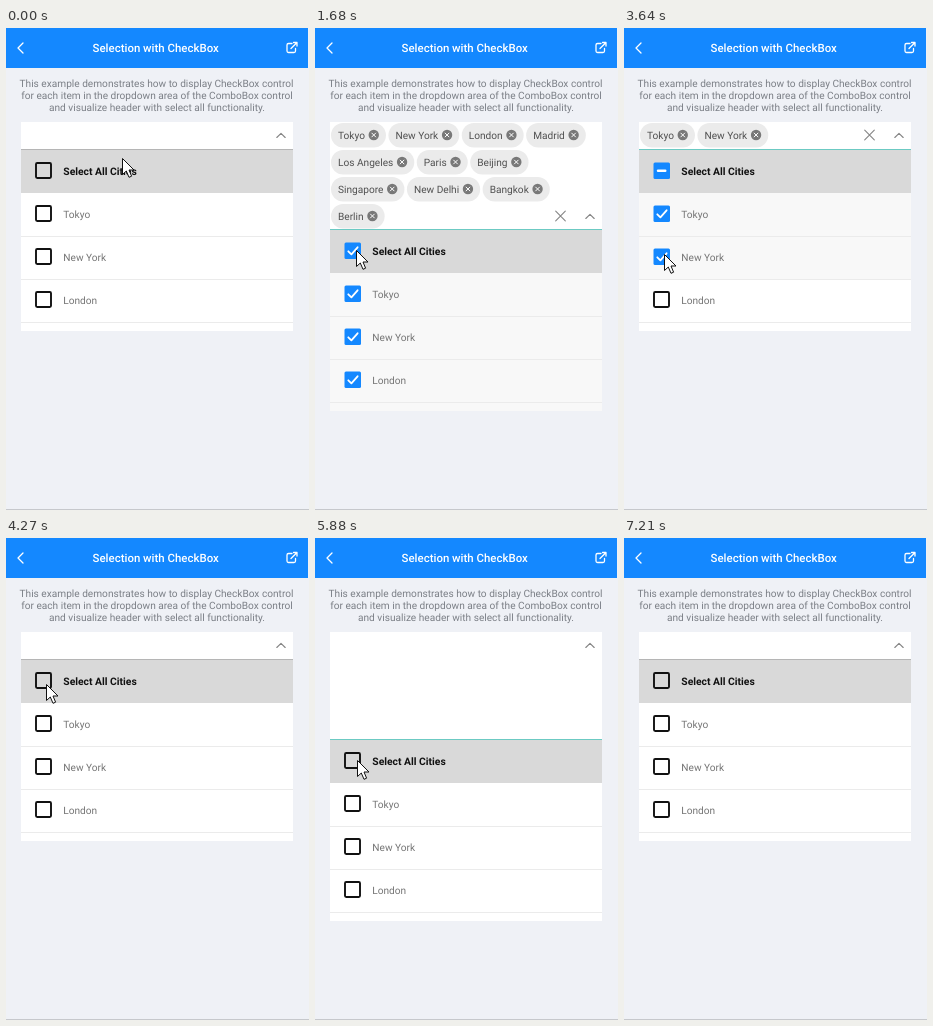
Animation, 303 px wide and 482 px high, one loop 8 s. Source, as an HTML page:

```html
<!DOCTYPE html>
<html lang="en">
<head>
<meta charset="utf-8">
<title>Selection with CheckBox</title>
<style>
html, body { margin: 0; height: 100%; overflow: hidden; background: #eff1f6; }
svg { display: block; width: 303px; height: 482px; font: 10.15px Roboto, sans-serif; text-rendering: geometricPrecision; }
.line { fill: none; stroke-linecap: round; stroke-linejoin: round; }
</style>
</head>
<body>
<svg viewBox="0 0 303 482">
  <rect width="302" height="40" fill="#1488ff"/>
  <rect y="481" width="303" height="1" fill="#c6c8cc"/>
  <text x="149.7" y="24" text-anchor="middle" font-size="11.45" font-weight="500" fill="#fff">Selection with CheckBox</text>
  <g class="line" stroke="#fff" stroke-width="1.3">
    <path d="M17 15L12 20L17 25"/>
    <path d="M286 15.500H282.500Q281 15.500 281 17V23Q281 24.500 282.500 24.500H288Q289.500 24.500 289.500 23V20.500M285 20.500L291 14.500M287.500 14.500H291V18"/>
  </g>
  <g text-anchor="middle" fill="#7b7f86">
    <text x="150.5" y="58.5">This example demonstrates how to display CheckBox control</text>
    <text x="151" y="70.5">for each item in the dropdown area of the ComboBox control</text>
    <text x="151" y="82.5">and visualize header with select all functionality.</text>
  </g>
  <g id="combo"></g>
  <path id="cursor" d="M0.500 0.500V16.500L4.300 13L7 19.300L9.600 18.200L7 12H12Z" fill="#fff" stroke="#111"/>
</svg>
<script>
const LOOP = 8000, STEP = 70;
const combo = document.getElementById('combo');
const cursor = document.getElementById('cursor');
const cities = ['Tokyo', 'New York', 'London', 'Madrid', 'Los Angeles', 'Paris',
  'Beijing', 'Singapore', 'New Delhi', 'Bangkok', 'Berlin'];
const ALL = cities.length;

// click time, cities selected afterwards
const clicks = [[0, 0], [770, ALL], [1960, 0], [2730, 1], [3360, 2], [4130, 0], [4900, ALL], [5880, 0]];

// pointer moves: arrival time, duration, x, y
const moves = [
  [560, 560, 37, 146], [1400, 210, 46, 246], [1680, 140, 41, 222],
  [2380, 280, 39, 195], [3080, 280, 40, 226], [3920, 280, 40, 146],
  [5600, 420, 42, 222], [6930, 840, 176, 225], [7210, 280, 240, 490]
];

const pen = document.createElement('canvas').getContext('2d');
pen.font = '10.15px Roboto, sans-serif';

const rect = (x, y, w, h, fill, more = '') =>
  `<rect x="${x}" y="${y}" width="${w}" height="${h}" fill="${fill}" ${more}/>`;
const line = (d, stroke, width) =>
  `<path class="line" d="${d}" stroke="${stroke}" stroke-width="${width}"/>`;
const text = (x, y, fill, label, more = '') =>
  `<text x="${x}" y="${y}" fill="${fill}" ${more}>${label}</text>`;
const cross = (x, y, r, stroke, width) =>
  line(`M${x - r} ${y - r}l${2 * r} ${2 * r}m0 ${-2 * r}l${-2 * r} ${2 * r}`, stroke, width);

// mark: 0 empty, 1 partial, 2 checked
function checkBox(top, mark) {
  if (!mark) return rect(30, top + 13, 15, 15, 'none', 'rx="1.2" stroke="#111" stroke-width="1.9"');
  const y = top + 20.8;
  const d = mark == 1 ? `M34 ${y}H41.300` : `M33.300 ${y + .5}L36.400 ${y + 3.600}L42.600 ${y - 3.500}`;
  return rect(29.5, top + 12.5, 16.5, 16.5, '#1488ff', 'rx="1.5"') + line(d, '#fff', mark == 1 ? 2.4 : 1.8);
}

function chips(count) {
  let out = '', x = 16, y = 107;
  for (const city of cities.slice(0, count)) {
    const width = pen.measureText(city).width + 28;
    if (x + width > 284) { x = 16; y += 27; }
    const close = x + width - 12.2;
    out += rect(x, y - 12, width, 24.5, '#ebebeb', 'rx="12.2"')
      + text(x + 7, y + 3.6, '#505050', city)
      + `<circle cx="${close}" cy="${y}" r="5.2" fill="#787878"/>`
      + cross(close, y, 1.9, '#fff', 1);
    x += width + 2.5;
  }
  return out;
}

function draw(count, chipCount, tall) {
  const top = tall ? 202 : 122;
  const iconY = tall && chipCount ? 188 : 107;
  const label = (y, fill, name, more) => text(57.3, y + 25.3, fill, name, more);
  let out = rect(15, 94, 272, top - 94, '#fff') + chips(chipCount)
    + line(`M270.800 ${iconY + 2.500}l4.200 -4.200l4.200 4.200`, '#858585', 1.1)
    + (chipCount ? cross(245.5, iconY, 4.8, '#858585', 1.1) : '')
    + rect(15, top, 272, 43, '#d9d9d9')
    + rect(15, top - 1, 272, 1, tall || chipCount ? '#6ccac3' : '#b5b5b5')
    + checkBox(top, count == ALL ? 2 : Math.min(count, 1))
    + label(top, '#111', 'Select All Cities', 'font-weight="700" font-size="10.35"');
  for (let i = 0; i < 4; i++) {
    const y = top + 43 * (i + 1), on = i < count;
    out += rect(15, y, 272, i < 3 ? 43 : 9, on ? '#f8f8f8' : '#fff');
    if (i) out += rect(15, y, 272, 1, '#ebebeb');
    if (i < 3) out += checkBox(y, on ? 2 : 0) + label(y, '#757575', cities[i]);
  }
  combo.innerHTML = out;
}

const selected = t => clicks.findLast(c => c[0] <= Math.max(t, 0))[1];

function pointer(t) {
  let x = 116, y = 130;
  for (const [end, span, toX, toY] of moves) {
    const k = Math.min(1, Math.max(0, 1 - (end - t) / span));
    const eased = k * k * (3 - 2 * k);
    x += (toX - x) * eased;
    y += (toY - y) * eased;
  }
  return `translate(${x} ${y})`;
}

let shown;
function frame(now) {
  const t = Math.floor(now % LOOP / STEP) * STEP;
  // new chips and the field height follow one step after a click
  const count = selected(t), before = selected(t - STEP);
  const key = `${count} ${before}`;
  if (key != shown) draw(count, Math.min(count, before), before == ALL);
  shown = key;
  cursor.setAttribute('transform', pointer(t));
  requestAnimationFrame(frame);
}
frame(0);
</script>
</body>
</html>
```
